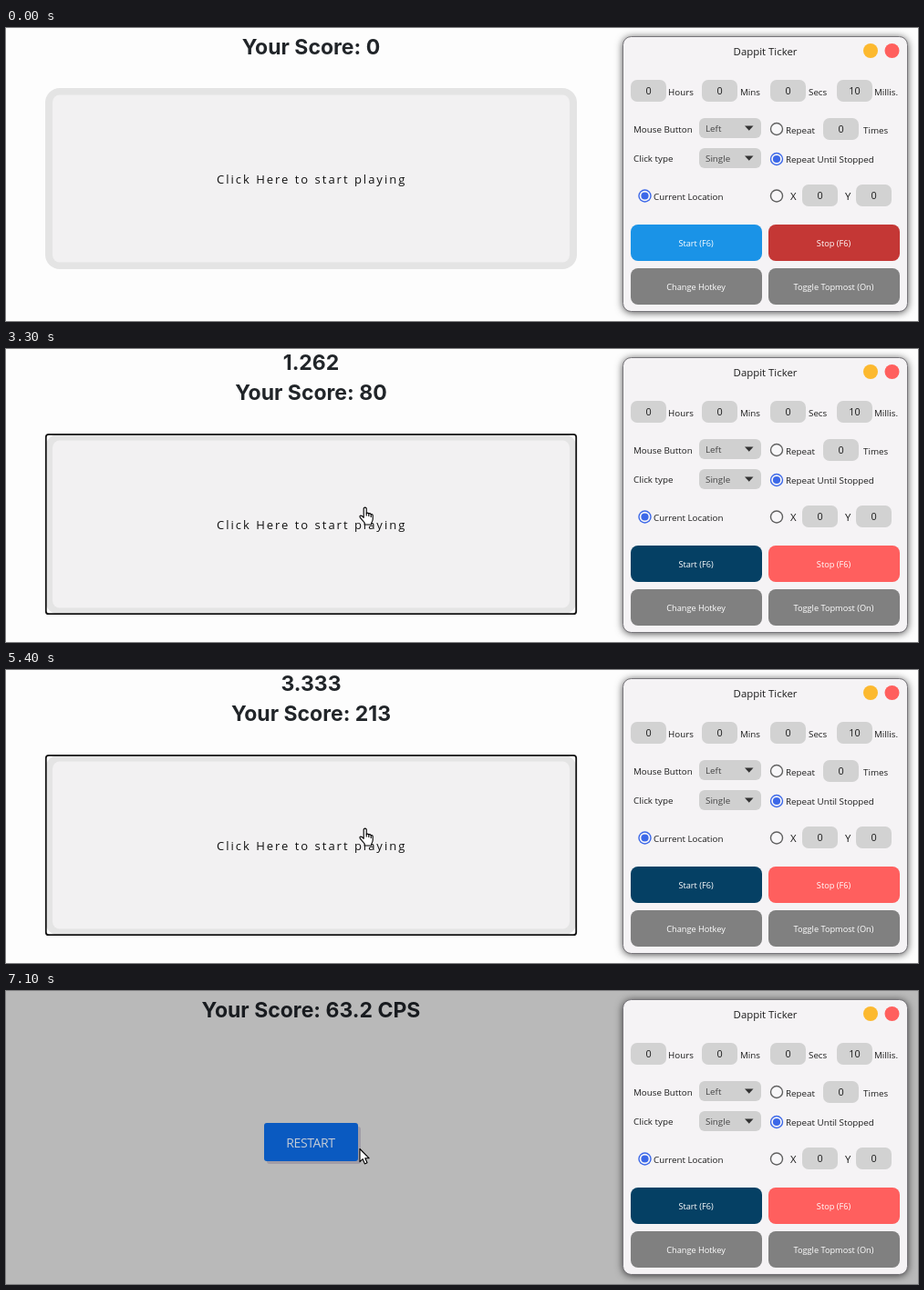
An HTML page with a canvas for the animation above (7.2 s loop, 1000 by 322 pixels).

```html
<!DOCTYPE html>
<html lang="en">
<head>
<meta charset="utf-8">
<title>Click speed test</title>
<style>
html, body { margin: 0; width: 1000px; height: 322px; overflow: hidden; background: #fdfdfd; }
canvas { display: block; }
</style>
</head>
<body>
<canvas id="stage" width="1000" height="322"></canvas>
<script>
const ctx = document.getElementById('stage').getContext('2d');
const LOOP = 7200, STEP = 100;
const START_AT = 1700, RUN_AT = 2100, END_AT = 7100;
const UI = '"Open Sans", "Noto Sans", sans-serif';
const HEAD = 'Inter, "Open Sans", sans-serif';

// time, value pairs
const CLOCK = [[2040, 0], [3300, 1.262], [4800, 2.79], [5400, 3.333], [6800, 4.776], [7000, 4.978]];
const SCORE = [[2040, 0], [3300, 80], [4800, 176], [5400, 213], [6800, 304], [7000, 315]];

function lookup(points, t) {
  for (let i = 1; i < points.length; i++) {
    const [t0, a] = points[i - 1], [t1, b] = points[i];
    if (t <= t1) return a + (b - a) * Math.max(0, (t - t0) / (t1 - t0));
  }
  return points[points.length - 1][1];
}

function box(x, y, w, h, r, fill) {
  ctx.beginPath();
  ctx.roundRect(x, y, w, h, r);
  ctx.fillStyle = fill;
  ctx.fill();
}

function disc(x, y, r, fill) {
  ctx.beginPath();
  ctx.arc(x, y, r, 0, Math.PI * 2);
  ctx.fillStyle = fill;
  ctx.fill();
}

function text(str, x, y, size, { align = 'left', color = '#1c1c1c', font = UI, weight = 400, gap = 0 } = {}) {
  ctx.font = `${weight} ${size}px ${font}`;
  ctx.letterSpacing = gap + 'px';
  ctx.textAlign = align;
  ctx.fillStyle = color;
  ctx.fillText(str, x, y);
}

function heading(str, y, color = '#212529') {
  text(str, 334.5, y, 23, { align: 'center', color, font: HEAD, weight: 700 });
}

function field(value, x, y) {
  box(x, y, 39, 24, 7, '#d2d2d2');
  text(value, x + 19.5, y + 16, 10.8, { align: 'center' });
}

function dropdown(value, y) {
  box(760, y, 68, 22, 6, '#d0d0d0');
  text(value, 767, y + 15, 9.8, { color: '#444' });
  ctx.beginPath();
  ctx.moveTo(810, y + 8.5);
  ctx.lineTo(819.5, y + 8.5);
  ctx.lineTo(814.75, y + 13.8);
  ctx.fillStyle = '#333';
  ctx.fill();
}

function radio(x, y, on) {
  disc(x, y, 7.2, on ? '#3c68e8' : '#606060');
  disc(x, y, 5.8, '#f8f7f9');
  if (on) disc(x, y, 4.1, '#3c68e8');
}

function button(label, x, y, fill) {
  box(x, y, 144, 40, 8, fill);
  text(label, x + 71.5, y + 24, 9.2, { align: 'center', color: '#fff' });
}

function panel(started, hover) {
  ctx.save();
  ctx.shadowColor = 'rgba(0,0,0,.75)';
  ctx.shadowBlur = 8;
  ctx.shadowOffsetY = 1;
  box(676.5, 9.5, 312, 302, 9, '#f5f3f5');
  ctx.restore();
  ctx.strokeStyle = '#77757a';
  ctx.lineWidth = 1;
  ctx.stroke();

  text('Dappit Ticker', 832.5, 30, 11.4, { align: 'center' });
  disc(948, 25, 8, '#fcb92f');
  disc(971.5, 25, 8, '#ff5f5d');

  [['0', 685, 'Hours', 726], ['0', 763, 'Mins', 805], ['0', 838, 'Secs', 880], ['10', 911, 'Millis.', 952]]
    .forEach(([value, x, label, lx]) => {
      field(value, x, 57);
      text(label, lx, 73.5, 9.8);
    });

  text('Mouse Button', 688, 115, 9.8);
  text('Click type', 688, 147, 9.8);
  dropdown('Left', 99);
  dropdown('Single', 132);

  radio(845, 111, false);
  text('Repeat', 855, 115.5, 9.8);
  field('0', 896, 99);
  text('Times', 940, 116, 9.8);
  radio(845, 144, true);
  text('Repeat Until Stopped', 855, 148, 9.8);

  radio(700.5, 184.5, true);
  text('Current Location', 710, 189, 9.8);
  radio(845, 184.5, false);
  text('X', 860, 189, 11.4);
  field('0', 873, 172);
  text('Y', 920, 189, 11.4);
  field('0', 932, 172);

  button('Start (F6)', 685, 216, started ? '#054064' : hover ? '#2b9be5' : '#1a93e7');
  button('Stop (F6)', 836, 216, started ? '#ff5f5e' : '#c43735');
  button('Change Hotkey', 685, 264, '#808080');
  button('Toggle Topmost (On)', 836, 264, '#808080');
}

function clickArea(y, focused) {
  box(43, y, 583, 199, 16, '#e4e4e4');
  box(51, y + 7.5, 567, 184, 8, '#f2f1f2');
  if (focused) {
    ctx.beginPath();
    ctx.roundRect(43.8, y + .8, 581.4, 197.4, 3);
    ctx.strokeStyle = '#141414';
    ctx.lineWidth = 1.8;
    ctx.stroke();
  }
  text('Click Here to start playing', 231, y + 105, 13, { gap: 2, color: '#111' });
}

function restart() {
  box(286, 149, 103, 41, 3, '#a09ca6');
  box(283, 145, 103, 42, 3, '#0a5ac1');
  text('RESTART', 334, 171.5, 14, { align: 'center', color: '#c4ccd6', gap: -.4 });
}

const ARROW = new Path2D('M0 0V14.2L3.2 11.2L5.4 16.4L8 15.3L5.8 10.3H10.2Z');
const HAND = new Path2D('M5 1.6Q6.5 -.4 8 1.6V7Q9.5 6 10.6 7.4Q12 6.6 13 8.2Q14.6 7.6 15 9.4V13.5Q14.8 16 13.5 17.5V19.5H6V17.5L1 11.6Q.2 9.6 2 9.6Q3.5 9.8 5 11.8Z');

function pointer(shape, x, y) {
  ctx.save();
  ctx.translate(x, y);
  ctx.fillStyle = '#fff';
  ctx.fill(shape);
  ctx.strokeStyle = '#000';
  ctx.lineWidth = 1.1;
  ctx.lineJoin = 'round';
  ctx.stroke(shape);
  if (shape === HAND) {
    ctx.beginPath();
    [[8, 7], [10.6, 7.6], [13, 8.4]].forEach(([lx, ly]) => {
      ctx.moveTo(lx, ly);
      ctx.lineTo(lx, ly + 3);
    });
    ctx.stroke();
  }
  ctx.restore();
}

function glide(t, t0, t1, a, b) {
  const p = Math.min(1, Math.max(0, (t - t0) / (t1 - t0)));
  const e = p * p * (3 - 2 * p);
  return [a[0] + (b[0] - a[0]) * e, a[1] + (b[1] - a[1]) * e];
}

function cursorAt(t) {
  const below = [690, 335], start = [748.5, 237], area = [388, 173.5];
  return t < START_AT ? glide(t, 200, 800, below, start) : glide(t, START_AT, 2000, start, area);
}

function draw(t) {
  const running = t >= RUN_AT && t < END_AT, ended = t >= END_AT;
  const [cx, cy] = cursorAt(t);

  ctx.fillStyle = ended ? '#b9b9b9' : '#fdfdfd';
  ctx.fillRect(0, 0, 1000, 322);

  if (ended) {
    heading('Your Score: 63.2 CPS', 28.5, '#181b1f');
    restart();
  } else if (running) {
    heading(String(Math.round(lookup(CLOCK, t) * 1000) / 1000), 22.5);
    heading('Your Score: ' + Math.floor(lookup(SCORE, t) + 1e-6), 55.5);
    clickArea(93, true);
  } else {
    heading('Your Score: 0', 28.5);
    clickArea(66, false);
  }

  panel(t >= START_AT, cx > 685 && cy < 256);

  const overArea = !ended && cx < 626;
  if (overArea) pointer(HAND, cx - .8, cy);
  else pointer(ARROW, cx, cy);
}

function tick(now) {
  draw(Math.floor(now % LOOP / STEP) * STEP);
  requestAnimationFrame(tick);
}
draw(0);
requestAnimationFrame(tick);
</script>
</body>
</html>
```
